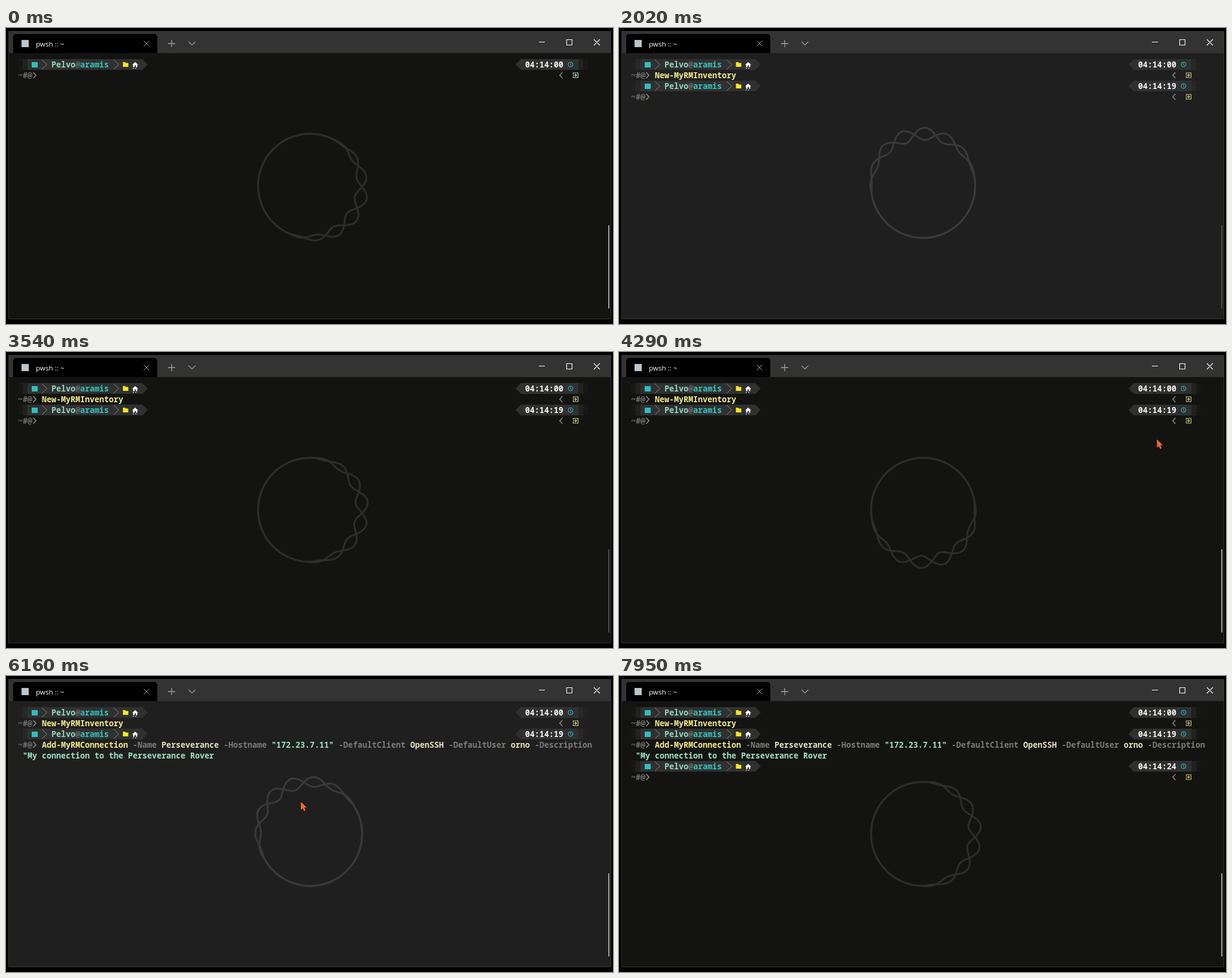
An HTML page with a canvas for the animation above (8000 ms loop, 1015x495 px).

```html
<!DOCTYPE html>
<html lang="en">
<head>
<meta charset="utf-8">
<title>Terminal</title>
<style>
  html, body { margin: 0; width: 100%; height: 100%; overflow: hidden; background: #000; }
  canvas { display: block; }
</style>
</head>
<body>
<canvas id="stage" width="1015" height="495"></canvas>
<script>
const ctx = document.getElementById('stage').getContext('2d');
const LOOP = 8000, CELL = 8, ROW = 18;
const MONO = '600 13.333px "Noto Sans Mono", "DejaVu Sans Mono", monospace';
const BAR = '#303030', TEAL = '#2cbfc1', GREY = '#7b7b78';
const YELLOW = '#f5ec88', MINT = '#9ee2c4', CREAM = '#e4e2c0';

// Keyframes: [time, value, ...]
const RING_TURN = [[0, 25], [760, 155], [2020, 260], [3540, 363.5], [5050, 518],
                   [6160, 599], [7950, 723.5], [8000, 727]];
const POINTER = [[0, 1040, 400], [90, 1040, 400], [240, 419, 240], [1740, 419, 240],
                 [1860, 1040, 330], [4130, 1040, 130], [4220, 970, 135], [4700, 493, 210],
                 [6950, 493, 210], [7130, 810, 300], [7200, 1040, 380], [8000, 1040, 380]];

const FIRST = [['New-MyRMInventory', YELLOW]];
const SECOND = [['Add-MyRMConnection ', YELLOW], ['-Name ', GREY], ['Perseverance ', CREAM],
  ['-Hostname ', GREY], ['"172.23.7.11" ', MINT], ['-DefaultClient ', GREY], ['OpenSSH ', CREAM],
  ['-DefaultUser ', GREY], ['orno ', CREAM], ['-Description', GREY]];
const SECOND_WRAP = [[' "My connection to the Perseverance Rover"', MINT]];

const between = (t, from, to) => t >= from && t < to;
const typed = (t, from, to, count) => Math.floor(count * Math.min(1, Math.max(0, (t - from) / (to - from))));
const rowTop = row => 52 + row * ROW;

function sample(keys, t) {
  const i = keys.findIndex(k => k[0] > t), a = keys[i - 1], b = keys[i];
  const f = (t - a[0]) / (b[0] - a[0]);
  return a.slice(1).map((v, n) => v + (b[n + 1] - v) * f);
}

function rect(x, y, w, h, color) {
  ctx.fillStyle = color;
  ctx.fillRect(x, y, w, h);
}

function poly(points, color) {
  ctx.fillStyle = color;
  ctx.beginPath();
  points.forEach(p => ctx.lineTo(...p));
  ctx.fill();
}

function stroke(path, color, width = 1) {
  ctx.strokeStyle = color;
  ctx.lineWidth = width;
  ctx.stroke(new Path2D(path));
}

function text(str, x, row, color) {
  ctx.font = MONO;
  ctx.fillStyle = color;
  ctx.fillText(str, x, rowTop(row) + 14);
}

function spans(list, x, row, limit = Infinity) {
  for (const [str, color] of list) {
    if (limit <= 0) return;
    text(str.slice(0, limit), x, row, color);
    x += str.length * CELL;
    limit -= str.length;
  }
}

function ring(turn, color) {
  ctx.strokeStyle = color;
  ctx.lineWidth = 3;
  for (const side of [1, -1]) {
    ctx.beginPath();
    for (let d = -180; d < 180; d += 1.5) {
      const swell = Math.abs(d) < 90 ? Math.cos(d * Math.PI / 180) ** 1.2 : 0;
      const r = 87 + side * 10.5 * swell * Math.sin(d * Math.PI / 24);
      const a = (turn + d) * Math.PI / 180;
      ctx.lineTo(508.5 + r * Math.cos(a), 264 + r * Math.sin(a));
    }
    ctx.closePath();
    ctx.stroke();
  }
}

// Two shaded cells that fade outwards in the given direction.
function shade(x, y, dir) {
  for (let i = 0; i < 16; i++)
    for (let j = 0; j < ROW; j++)
      if (i < 8 ? (i + j) % 2 === 0 : j % 2 === 0 && (i + j) % 4 === 0)
        rect(x + dir * i, y + j, 1, 1, BAR);
}

function prompt(row, time, exitColor, inputRow = row + 1) {
  const y = rowTop(row), mid = y + 9;
  shade(35, y, -1);
  poly([[36, y], [228, y], [237, mid], [228, y + ROW], [36, y + ROW]], BAR);
  rect(43, y + 5, 10, 9, TEAL);
  for (const x of [60, 180]) stroke(`M${x} ${y + 1}l8.5 8l-8.5 8`, '#85857f');
  text('Pelvo', 76, row, '#94d9c3');
  text('@', 116, row, '#6c7371');
  text('aramis', 124, row, '#31c5bd');
  poly([[195.5, y + 5], [199, y + 5], [200.5, y + 6.5], [204.5, y + 6.5], [204.5, y + 13], [195.5, y + 13]], '#f5e91c');
  poly([[211, y + 9.5], [216, y + 5], [221, y + 9.5], [219.5, y + 9.5], [219.5, y + 13.5], [217, y + 13.5],
        [217, y + 10.5], [215, y + 10.5], [215, y + 13.5], [212.5, y + 13.5], [212.5, y + 9.5]], '#fff');
  rect(212, y + 15, 2, 1, '#ddd');
  rect(216, y + 15, 2, 1, '#ddd');

  poly([[852, mid], [861, y], [957, y], [957, y + ROW], [861, y + ROW]], BAR);
  shade(957, y, 1);
  text(time, 868, row, '#f8f8f5');
  ctx.strokeStyle = TEAL;
  ctx.lineWidth = 1;
  ctx.beginPath();
  ctx.arc(944, mid, 4, 0, 7);
  ctx.stroke();
  stroke(`M944 ${mid - 2.5}v3l2 1`, TEAL);

  const c = rowTop(inputRow) + 9;
  text('~#@', 20, inputRow, '#72726d');
  stroke(`M45.5 ${c - 5}l4.5 5l-4.5 5`, '#85857f', 1.8);
  stroke(`M930.5 ${c - 5}l-4.5 5l4.5 5`, '#85857f', 1.6);
  stroke(`M948.5 ${c - 1.5}v-2.5h8v8h-8v-2.5M948 ${c}h6m-2.5 -2.5l2.5 2.5l-2.5 2.5`, exitColor, 1.2);
}

function windowFrame() {
  rect(4, 5, 1008, 37, '#333');
  ctx.fillStyle = '#000';
  ctx.beginPath();
  ctx.roundRect(12, 10, 241, 32, [5, 5, 0, 0]);
  ctx.fill();
  rect(26, 20, 12, 12, '#b9c6ca');
  ctx.font = '11.6px "Open Sans", "Noto Sans", sans-serif';
  ctx.fillStyle = '#fff';
  ctx.fillText('pwsh :: ~', 50, 31);
  stroke('M230.5 21.5l9 9m0 -9l-9 9', '#a5a5a5');
  stroke('M271 26h12m-6 -6v12', '#a0a0a0', 1.3);
  stroke('M305.5 23l5.5 5.5l5.5 -5.5', '#a0a0a0', 1.2);
  stroke('M891 23.5h10M937.5 19.5h9v9h-9zM983 19l10 10m0 -10l-10 10', '#fff', 1.1);
  stroke('M4.5 42V486.5H1011.5V42', '#343434');
}

function pointer(x, y) {
  if (x > 1005) return;
  ctx.save();
  ctx.translate(x, y);
  const shape = new Path2D('M0 0V14L3 11.2L5.4 16L8 14.8L5.8 10H10Z');
  ctx.lineWidth = 1.6;
  ctx.strokeStyle = '#16100c';
  ctx.stroke(shape);
  ctx.fillStyle = '#ee682f';
  ctx.fill(shape);
  ctx.restore();
}

function draw(t) {
  const focused = between(t, 250, 2800) || between(t, 5150, 7750);
  rect(0, 0, 1015, 495, '#000');
  rect(4, 5, 1008, 482, focused ? '#1f1f1f' : '#131311');
  ring(sample(RING_TURN, t)[0], focused ? '#3a3a3a' : '#2d2d2d');
  rect(1007, 330, 2, 139, between(t, 1900, 4100) ? '#4b4b4b' : '#a0a0a0');

  prompt(0, '04:14:00', t < 250 ? '#a9d9bd' : '#d2cd85');
  spans(FIRST, 60, 1, typed(t, 400, 520, 17));
  if (t >= 1450) {
    prompt(2, '04:14:19', '#bfd768');
    const count = typed(t, 5350, 5700, 156);
    if (count && t < 6450) rect(920, rowTop(3), 44, ROW, '#1f1f1f');
    if (t >= 6450) rect(920, rowTop(3), 44, ROW, focused ? '#1f1f1f' : '#131311');
    spans(SECOND, 60, 3, count);
    spans(SECOND_WRAP, 20, 4, count - 115);
  }
  if (t >= 6450) prompt(5, '04:14:24', '#d3c460');

  if (between(t, 1450, 1980) || between(t, 2510, 2800)) rect(60, rowTop(3), 1, ROW, '#eee');
  if (between(t, 6450, 6980) || between(t, 7510, 7750)) rect(60, rowTop(6), 1, ROW, '#eee');

  windowFrame();
  pointer(...sample(POINTER, t));
}

function tick() {
  draw(performance.now() % LOOP);
  requestAnimationFrame(tick);
}
tick();
</script>
</body>
</html>
```
